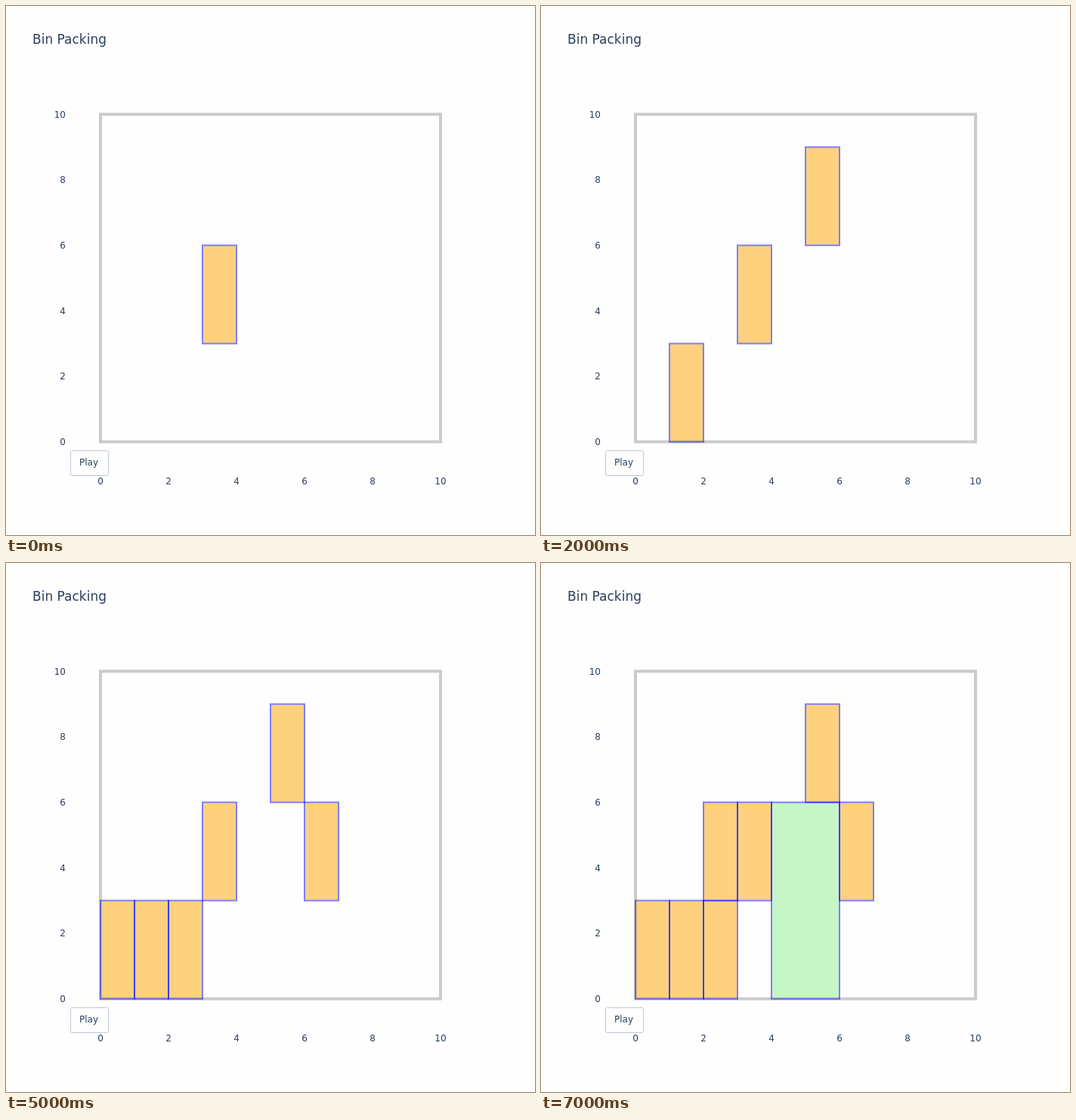
Animation of 700x700 px, one loop 8000 ms. Source, as an HTML page:

```html
<!DOCTYPE html>
<html lang="en">
<head>
<meta charset="utf-8">
<title>Bin Packing</title>
<style>
  html, body { margin: 0; width: 100%; height: 100%; overflow: hidden; background: #fefefe; }
  svg { display: block; width: 700px; height: 700px; }
  text { font: 12px Verdana, "DejaVu Sans", sans-serif; fill: #2a3f5f; white-space: pre; }
  .title { font-size: 17px; }
</style>
</head>
<body>
<svg id="stage" viewBox="0 0 700 700"></svg>
<script>
const STEP = 1000;
const LOOP = 8000;
const ORANGE = "#ffa500";
const GREEN = "#90ee90";

// Bin coordinates in placement order: x, y, width, height, fill
const items = [
  [3, 3, 1, 3, ORANGE],
  [1, 0, 1, 3, ORANGE],
  [5, 6, 1, 3, ORANGE],
  [0, 0, 1, 3, ORANGE],
  [2, 0, 1, 3, ORANGE],
  [6, 3, 1, 3, ORANGE],
  [2, 3, 1, 3, ORANGE],
  [4, 0, 2, 6, GREEN]
];

const stage = document.getElementById("stage");
const toX = x => 125 + 45 * x;
const toY = y => 576.667 - 43.3333 * y;

function add(tag, attrs, content = "") {
  const node = document.createElementNS("http://www.w3.org/2000/svg", tag);
  for (const key in attrs) node.setAttribute(key, attrs[key]);
  node.textContent = content;
  return stage.appendChild(node);
}

function addBox(x, y, w, h, attrs) {
  return add("rect", {
    x: toX(x), y: toY(y + h),
    width: toX(w) - toX(0), height: toY(0) - toY(h),
    ...attrs
  });
}

addBox(0, 0, 10, 10, { fill: "none", stroke: "#cbcbcb", "stroke-width": 4 });

// Group opacity lets the outline replace the fill beneath it.
const boxes = items.map(([x, y, w, h, fill]) =>
  addBox(x, y, w, h, { fill, stroke: "#00f", "stroke-width": 2, opacity: 0.5 }));

for (let v = 0; v <= 10; v += 2) {
  add("text", { x: toX(v), y: 633, "text-anchor": "middle" }, v);
  add("text", { x: 79, y: toY(v) + 4.2, "text-anchor": "end" }, v);
}

add("text", { x: 35, y: 50, class: "title" }, "Bin Packing");
add("rect", { x: 85.5, y: 588.5, width: 50, height: 33, rx: 2, fill: "#fefefe", stroke: "#bec8d9" });
add("text", { x: 97, y: 608 }, "Play");

function draw() {
  const placed = Math.floor((performance.now() % LOOP) / STEP);
  boxes.forEach((box, i) => box.setAttribute("visibility", i <= placed ? "visible" : "hidden"));
  requestAnimationFrame(draw);
}
draw();
</script>
</body>
</html>
```
